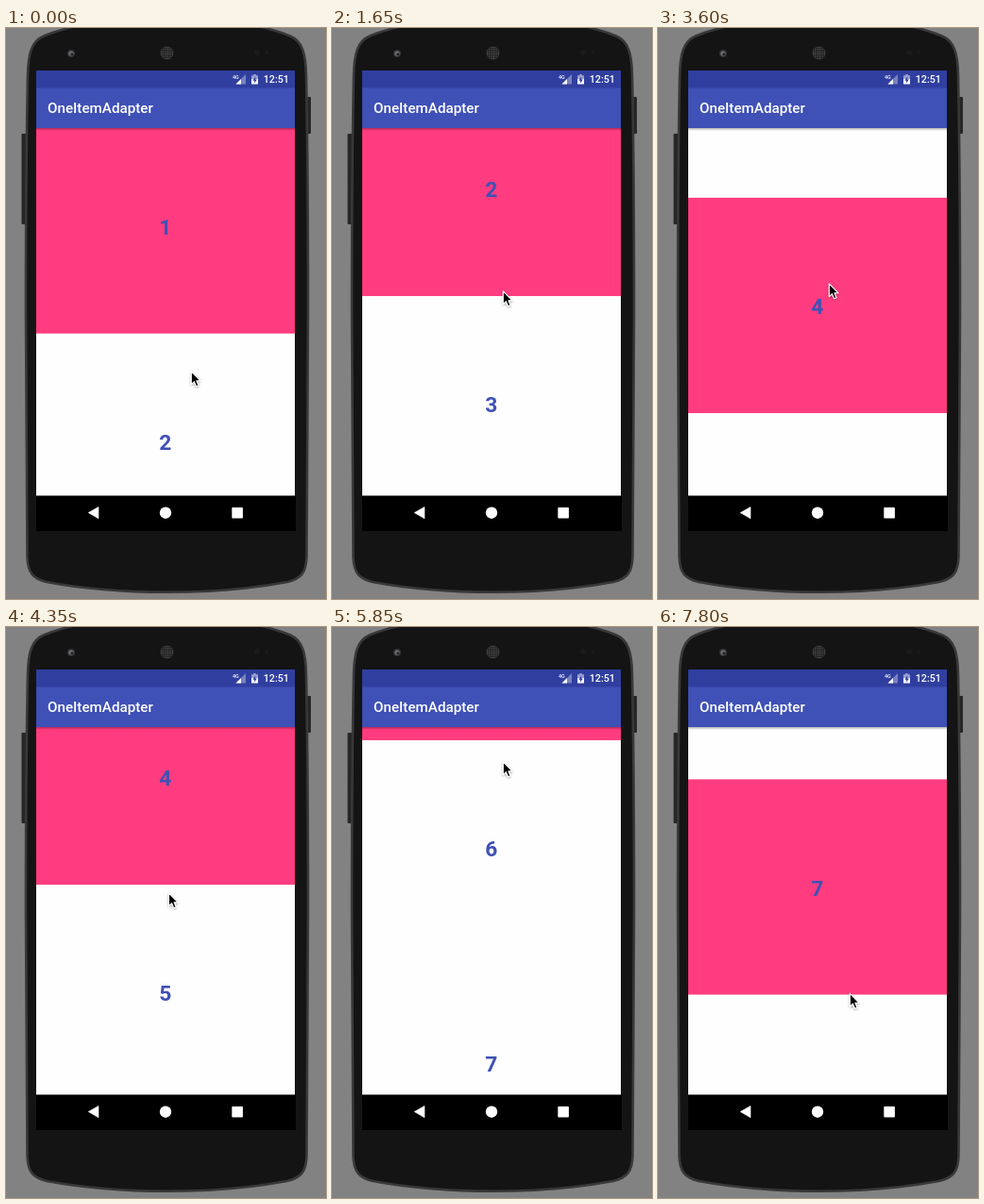
An HTML page for the animation above (8 s loop, 339 px wide and 605 px high).

```html
<!DOCTYPE html>
<html lang="en">
<head>
<meta charset="utf-8">
<title>OneItemAdapter</title>
<style>
  html, body { margin: 0; width: 100%; height: 100%; overflow: hidden; background: #828282; }
  svg { display: block; width: 100%; height: 100%; font-family: Roboto, sans-serif; }
  .digit { font-size: 22.8px; font-weight: 700; fill: #3f51b5; text-anchor: middle; }
  .bar { fill: #fff; font-weight: 500; }
</style>
</head>
<body>
<svg viewBox="0 0 339 605" xmlns="http://www.w3.org/2000/svg">
  <defs>
    <linearGradient id="shade" x1="0" y1="0" x2="0" y2="1">
      <stop offset="0" stop-color="#000" stop-opacity=".3"/>
      <stop offset="1" stop-color="#000" stop-opacity="0"/>
    </linearGradient>
    <pattern id="mesh" width="2.4" height="2.4" patternUnits="userSpaceOnUse">
      <rect width="2.4" height="2.4" fill="#1c1c1c"/>
      <circle cx="1.2" cy="1.2" r=".75" fill="#5c5c5c"/>
    </pattern>
    <clipPath id="view"><rect x="32" y="106" width="274" height="389.5"/></clipPath>
    <filter id="soft" x="-50%" y="-50%" width="200%" height="200%">
      <feDropShadow dx="0" dy="1" stdDeviation=".8" flood-opacity=".4"/>
    </filter>
  </defs>

  <rect width="339" height="605" fill="#828282"/>

  <!-- phone -->
  <rect x="16.5" y="112" width="5" height="96" rx="1" fill="#262626"/>
  <rect x="319" y="73" width="4" height="39" rx="1" fill="#262626"/>
  <path d="M21 300 C21 180 22 100 23 50 C23.5 27 27 14 40 8.5 Q52 3.5 70 -1 V-4 H271 V-1 Q289 3.5 301 8.5 C314 14 317.5 27 318 50 C319 100 320 180 320 300 C320 420 319 500 318.5 560 C318 578 312 583.5 298 587 Q240 597.8 170.5 597.8 Q101 597.8 43 587 C29 583.5 23 578 22.5 560 C22 500 21 420 21 300Z" fill="#141414" stroke="#383838" stroke-width="2.6"/>
  <circle cx="69" cy="27" r="4" fill="#333"/>
  <circle cx="69" cy="27" r="2.6" fill="#6d7078"/>
  <circle cx="69.8" cy="27.8" r="1.5" fill="#222"/>
  <circle cx="170.5" cy="26.5" r="7" fill="url(#mesh)"/>
  <circle cx="266" cy="26" r="3" fill="#1d1a1a"/>
  <circle cx="276" cy="26" r="1.8" fill="#1d1a1a"/>

  <!-- list -->
  <rect x="32" y="106" width="274" height="390" fill="#fefefe"/>
  <g id="list" clip-path="url(#view)"></g>

  <!-- bars -->
  <rect x="32" y="106" width="274" height="3" fill="url(#shade)"/>
  <rect x="32" y="45" width="274" height="19" fill="#303f9f"/>
  <rect x="32" y="63.5" width="274" height="42.5" fill="#3f50b6"/>
  <text class="bar" x="44" y="90.3" font-size="15.2">OneItemAdapter</text>
  <text class="bar" x="240" y="53.5" font-size="5.4">4G</text>
  <path d="M254 49 V59.5 H243.5Z" fill="#fff" opacity=".35"/>
  <path d="M249 54 V59.5 H243.5Z" fill="#fff"/>
  <path d="M262.2 49 H264.8 V50.2 H267 V54 H260 V50.2 H262.2Z" fill="#fff" opacity=".5"/>
  <path d="M260 54 H267 V59.5 H260Z" fill="#fff"/>
  <path d="M264.2 51.5 L261.4 55.7 H263.1 V58.6 L265.9 54.4 H264.2Z" fill="#303f9f"/>
  <text class="bar" x="272.8" y="58.4" font-size="10.7">12:51</text>
  <rect x="32" y="495.5" width="275" height="37.5" fill="#000"/>
  <path d="M98 507.500 V519.8 L87.3 513.6Z" fill="#fff" stroke="#fff" stroke-width=".6" stroke-linejoin="round"/>
  <circle cx="169" cy="513.7" r="6.2" fill="#fff"/>
  <rect x="239.3" y="508" width="11.6" height="11.6" rx=".8" fill="#fff"/>

  <g id="cursor">
    <path filter="url(#soft)" d="M.3 .8 V14.600 L3.4 11.7 L5.6 16.7 L8 15.7 L5.9 10.8 H10.1Z" fill="#000" stroke="#fff" stroke-width="1.1" stroke-linejoin="round"/>
  </g>
</svg>
<script>
const LOOP = 8000, STEP = 150, LAST = 7800;
const ROW = 228.33, COUNT = 8, TOP = 95.5;
const TRAVEL = 450, DECAY = 215;

// Each swipe drags the list from one point to another and may fling it on;
// then a row may be tapped, and the pointer leaves for the next swipe.
const swipes = [
  { down: 0, up: 450, from: [196, 363], to: [185, 251], fling: 0, tap: 600, row: 2, leave: 700 },
  { down: 1350, up: 1950, from: [181, 434], to: [181, 122], fling: 4, tap: 1950, row: 3, leave: 1950 },
  { down: 2850, up: 3450, from: [181, 441], to: [181, 270], fling: 3.3, tap: 3600, row: 4, leave: 3600 },
  { down: 4050, up: 4550, from: [178, 414.5], to: [169, 208.5], fling: 0, tap: 4650, row: 5, leave: 4800 },
  { down: 5350, up: 5800, from: [181, 429], to: [181, 142], fling: 105.4, leave: 6000 },
  { down: 6750, up: 7200, from: [200, 474], to: [203, 387.5], fling: 18, tap: 7800, row: 7, leave: LOOP }
];

const mix = (a, b, p) => a + (b - a) * p;

function ease(t, start, end) {
  const p = Math.min(1, Math.max(0, (t - start) / (end - start)));
  return p * p * (3 - 2 * p);
}

function listTop(t) {
  return swipes.reduce((top, s) => {
    const drag = (s.from[1] - s.to[1]) * ease(t, s.down, s.up);
    const glide = s.fling * (1 - Math.exp(-Math.max(0, t - s.up) / DECAY));
    return top - drag - glide;
  }, TOP);
}

function pointerAt(t) {
  let i = swipes.length - 1;
  while (i > 0 && t < swipes[i].down) i--;
  const s = swipes[i], next = swipes[i + 1] || s;
  return t < s.leave
    ? s.from.map((v, n) => mix(v, s.to[n], ease(t, s.down, s.up)))
    : s.to.map((v, n) => mix(v, next.from[n], ease(t, s.leave, s.leave + TRAVEL)));
}

function chosenRow(t) {
  return swipes.reduce((row, s) => (s.tap <= t ? s.row : row), 1);
}

function add(parent, tag, attrs) {
  const el = document.createElementNS("http://www.w3.org/2000/svg", tag);
  for (const name in attrs) el.setAttribute(name, attrs[name]);
  return parent.appendChild(el);
}

const list = document.getElementById("list");
const cursor = document.getElementById("cursor");
const rows = Array.from({ length: COUNT }, (_, i) => {
  const g = add(list, "g", {});
  const back = add(g, "rect", { x: 32, width: 274, height: ROW });
  add(g, "text", { class: "digit", x: 168.8, y: 123.2 }).textContent = i + 1;
  return { g, back };
});

function draw(time) {
  const t = Math.min(Math.floor(time / STEP) * STEP, LAST);
  const top = listTop(t), chosen = chosenRow(t);
  rows.forEach(({ g, back }, i) => {
    g.setAttribute("transform", `translate(0 ${top + i * ROW})`);
    back.setAttribute("fill", i + 1 === chosen ? "#ff3c7f" : "#fefefe");
  });
  cursor.setAttribute("transform", `translate(${pointerAt(t).join(" ")})`);
}

const start = performance.now();
function tick() {
  draw((performance.now() - start) % LOOP);
  requestAnimationFrame(tick);
}
tick();
</script>
</body>
</html>
```
